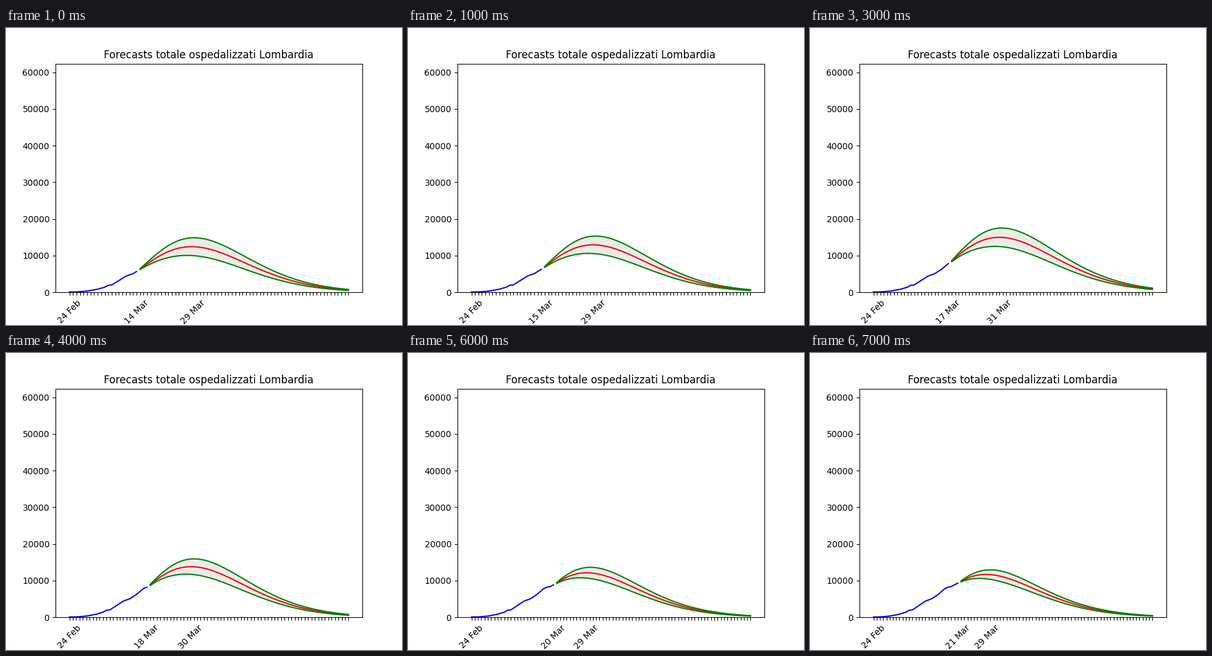
A matplotlib script for the animation above (8000 ms loop, 640 px wide and 480 px high).

```python
import matplotlib.pyplot as plt
import numpy as np
from matplotlib.animation import FuncAnimation

HORIZON = 60
FIRST_END = 19  # index of 14 Mar, counting days from 24 Feb
Y_MAX = 62350

# bends of the observed curve: (day, patients)
BENDS = [(0, 95), (2, 104), (5, 336), (8, 850), (10, 1413), (11, 1931),
         (12, 2020), (16, 4412), (18, 5085), (20, 6267), (22, 7832),
         (23, 8209), (24, 8393), (26, 9351)]

# peak of each forecast: (day, patients)
PEAKS = [(34.6, 12450), (34.9, 12950), (34.9, 12900), (37.0, 15000),
         (36.2, 13820), (35.1, 12230), (35.1, 12150), (34.7, 11700)]


def observed(days):
    return np.interp(days, *zip(*BENDS))


def decline(t, top):
    """Log distance below the peak when the growth rate falls as log(t)."""
    return t * np.log(t / top) - t + top


def forecast(frame, today):
    """Days after today with the low, mid and high curves."""
    peak_day, peak = PEAKS[frame]
    ahead = np.arange(1, HORIZON + 1)
    start = observed(today) * (1.115 - 0.0095 * frame)

    depth = decline(ahead + 6, peak_day - today + 6)
    mid = peak * (start / peak) ** (depth / depth[0])
    spread = (0.218 - 0.009 * frame) * np.tanh(ahead / 11)
    return today + ahead, mid * (1 - spread), mid, mid * (1 + spread)


def date_label(day):
    return f"{24 + day} Feb" if day < 6 else f"{day - 5} Mar"


fig, ax = plt.subplots(figsize=(6.4, 4.8), dpi=100)


def draw(frame):
    today = FIRST_END + frame
    past = np.arange(today + 1)
    days, low, mid, high = forecast(frame, today)
    last = days[-1]

    ax.clear()
    ax.set_title("Forecasts totale ospedalizzati Lombardia")
    ax.plot(past, observed(past), color="blue")
    ax.plot(days, mid, color="red")
    ax.plot(days, low, color="green")
    ax.plot(days, high, color="green")
    ax.fill_between(days, low, high, color="#ebebeb", linewidth=0)

    # the peak's label carries the date of the day before its tick
    labels = [""] * (last + 1)
    labels[0] = date_label(0)
    labels[today] = date_label(today)
    top_day = round(PEAKS[frame][0])
    labels[top_day] = date_label(top_day - 1)
    ax.set_xticks(range(last + 1), labels, rotation=45)
    ax.set_xlim(-0.05 * last, 1.05 * last)
    ax.set_ylim(0, Y_MAX)


anim = FuncAnimation(fig, draw, frames=len(PEAKS), init_func=lambda: None,
                     interval=1000, repeat=True, repeat_delay=0)
plt.show()
```
